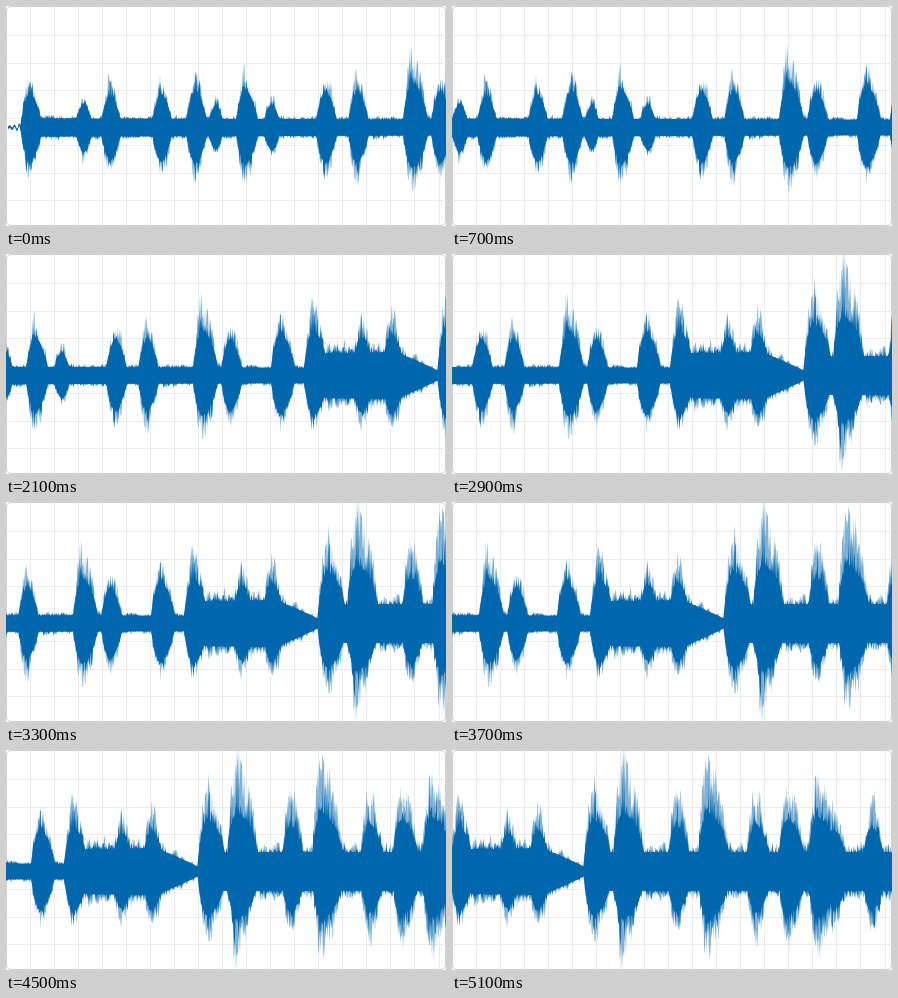
A matplotlib script that plays this animation: 440x220 px, repeating every 5200 ms.

```python
import numpy as np
import matplotlib.pyplot as plt
from matplotlib.animation import FuncAnimation
from matplotlib.patches import FancyBboxPatch
from matplotlib.transforms import Affine2D

W, H, DPI = 440, 220, 100
FRAMES, INTERVAL = 52, 100
SPEED = 10            # pixels scrolled per frame
STEP = 0.5            # pixels between samples
MID = 121.5
BLUE, GRID, BORDER = "#0067ac", "#ececec", "#d2d2d2"
PX = 72 / DPI         # one pixel in points

# peak position and height of each loud syllable
BURSTS = [
    (24, 58), (78, 38), (104, 54), (155, 56), (189, 63), (210, 33), (239, 68),
    (266, 36), (319, 62), (351, 60), (406, 86), (434, 62), (484, 78), (517, 84),
    (565, 66), (595, 75), (651, 110), (680, 135), (734, 86), (765, 135),
    (813, 92), (845, 108), (875, 125), (892, 74), (929, 82),
]

# background level: quiet, busy, pause, loud
FLOOR_X = [0, 14, 18, 508, 525, 600, 643, 660]
FLOOR_Y = [1.5, 1.5, 13, 11, 34, 36, 6, 29]


def envelope(x, below):
    level = np.interp(x, FLOOR_X, FLOOR_Y)
    for peak, height in BURSTS:
        d = x - peak
        width = np.where(d < 0, 10, 3 + 0.17 * height)
        if below and height > 60:
            height = 60 + 0.45 * (height - 60)
        dome = 1 - np.minimum(np.abs(d) / width, 1) ** 1.5
        tail = np.where(d > 0, 0.35 * np.exp(-np.abs(d) / 20), 0)
        level = np.maximum(level, height * np.maximum(dome, tail))
    return level


def layers(x, below, rng):
    """Heights of the pale streaks and of the solid core."""
    level = envelope(x, below)
    knots = np.arange(0, x[-1] + 3, 2.5)
    slow = np.interp(x, knots, rng.uniform(0.75, 1.05, knots.size))
    halo = level * slow * rng.uniform(0.65, 1.05, x.size)
    solid = 0.74 - 0.3 * np.minimum(level / 120, 1)
    core = level * (solid + 0.45 * slow * rng.random(x.size) ** 3)
    return halo, np.minimum(core, np.maximum(halo, solid * level))


rng = np.random.default_rng(7)
x = np.arange(2, W + SPEED * FRAMES, STEP)
mid = MID + np.where(x < 14, 3 * np.sin(1.3 * x) * x / 14, 0)

fig = plt.figure(figsize=(W / DPI, H / DPI), dpi=DPI, facecolor="white")
ax = fig.add_axes([0, 0, 1, 1])
ax.set_xlim(0, W)
ax.set_ylim(H, 0)
ax.axis("off")

card = FancyBboxPatch((0.5, 0.5), W - 1, H - 1,
                      boxstyle="round,pad=0,rounding_size=5",
                      fc="white", ec=BORDER, lw=PX, snap=False)
ax.add_patch(card)
style = dict(color=GRID, lw=PX, snap=False)
lines = [ax.axvline(int(24 + 24.06 * k) + 0.5, **style) for k in range(18)]
lines += [ax.axhline(int(29.5 + 27.5 * k) + 0.5, **style) for k in range(7)]
for line in lines:
    line.set_clip_path(card)

waves = []
for up, down, alpha in zip(layers(x, False, rng), layers(x, True, rng), (0.5, 1)):
    outline = np.r_[mid - up, (mid + down)[::-1]]
    waves += ax.fill(np.r_[x, x[::-1]], outline, fc=BLUE, ec="none",
                     lw=0, alpha=alpha, zorder=5)


def draw(frame):
    shift = Affine2D().translate(-SPEED * frame, 0)
    for wave in waves:
        wave.set_transform(shift + ax.transData)
    return waves


anim = FuncAnimation(fig, draw, frames=FRAMES, interval=INTERVAL,
                     repeat=True, repeat_delay=0)
plt.show()
```
